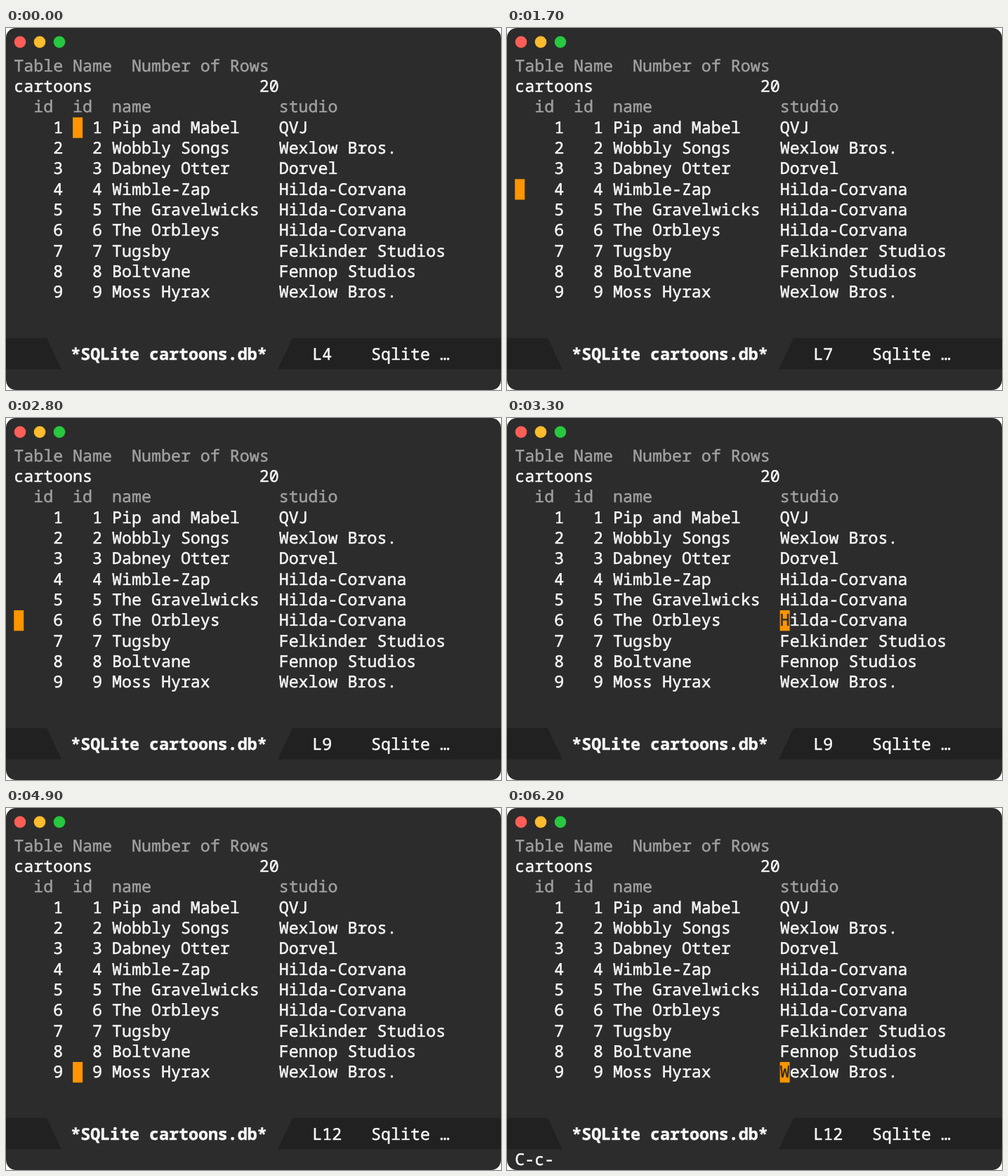
An HTML page that plays this animation: 705 px wide and 516 px high, repeating every 6500 ms.

```html
<!DOCTYPE html>
<html lang="en">
<head>
<meta charset="utf-8">
<style>
  html, body { margin: 0; width: 100%; height: 100%; overflow: hidden; background: #fff; }
  svg { display: block; }
  text {
    --ink: #f8f8f8;
    font: 500 23.3px "Noto Sans Mono", "DejaVu Sans Mono", monospace;
    white-space: pre;
    text-rendering: geometricPrecision;
    fill: var(--ink);
    stroke: var(--ink);
    stroke-width: 0.5px;
  }
  .head { --ink: #a0a0a0; }
  .bold { font-weight: 700; }
  .under { --ink: #2c2c2c; }
  circle { stroke: rgba(0, 0, 0, 0.12); stroke-width: 0.8px; }
</style>
</head>
<body>
<svg id="stage" width="705" height="516" viewBox="0 0 705 516">
  <rect width="705" height="516" rx="14" fill="#2c2c2c"/>
  <circle cx="20" cy="20" r="8.4" fill="#ff5f57"/>
  <circle cx="48" cy="20" r="8.4" fill="#febc2e"/>
  <circle cx="76" cy="20" r="8.4" fill="#28c840"/>
  <path d="M0 442H58L79 486.5H0Z M408 442H705V486.5H387Z" fill="#212121"/>
</svg>
<script>
const LOOP = 6500;
const LEFT = 11.25, CELL = 13.98, LINE = 29.33;
const TOP = 127.4, BASE = 149.8;
const MODE_BASE = 472.7, ECHO_BASE = 509;
const STOPS = [0, 6, 10, 27];
const FIRST_LINE = 4;
const BLINK_OFF = 5700, BLINK_ON = 6200, PREFIX_AT = 6000;

// Moments (in units of 100 ms) at which the cursor jumps to its next stop.
const JUMPS = [
  0, 1, 3, 4, 5, 7, 9, 11, 12, 14, 15, 17, 18, 20, 21, 23, 24, 25,
  27, 28, 30, 31, 33, 34, 36, 38, 39, 41, 42, 44, 46, 47, 49, 50, 52
];

const CARTOONS = [
  ["Pip and Mabel", "QVJ"],
  ["Wobbly Songs", "Wexlow Bros."],
  ["Dabney Otter", "Dorvel"],
  ["Wimble-Zap", "Hilda-Corvana"],
  ["The Gravelwicks", "Hilda-Corvana"],
  ["The Orbleys", "Hilda-Corvana"],
  ["Tugsby", "Felkinder Studios"],
  ["Boltvane", "Fennop Studios"],
  ["Moss Hyrax", "Wexlow Bros."]
];

const stage = document.getElementById("stage");

function add(tag, attrs) {
  const el = document.createElementNS("http://www.w3.org/2000/svg", tag);
  for (const key in attrs) el.setAttribute(key, attrs[key]);
  return stage.appendChild(el);
}

function addText(str, x, y, cls = "") {
  const el = add("text", { x, y, class: cls });
  el.textContent = str;
  return el;
}

const colX = col => LEFT + col * CELL;
const baseY = row => BASE + row * LINE;
const tableRow = (id, name, studio) =>
  id.padStart(5) + id.padStart(4) + " " + name.padEnd(17) + studio;

const rows = CARTOONS.map(([name, studio], i) =>
  tableRow(String(i + 1), name, studio));

addText("Table Name  Number of Rows", LEFT, baseY(-3), "head");
addText("cartoons".padEnd(25) + "20", LEFT, baseY(-2));
addText("  id  id  name".padEnd(27) + "studio", LEFT, baseY(-1), "head");
rows.forEach((row, i) => addText(row, LEFT, baseY(i)));

addText("*SQLite cartoons.db*", 92.2, MODE_BASE, "bold");
const lineNo = addText("", 436.2, MODE_BASE);
addText("Sqlite …", 520.1, MODE_BASE);
const prefix = addText("", LEFT, ECHO_BASE);

const cursor = add("rect", { width: CELL, height: LINE, fill: "#ff9500" });
const under = addText("", 0, 0, "under");

function draw(t) {
  const step = JUMPS.filter(j => j * 100 <= t).length;
  const row = Math.floor(step / STOPS.length);
  const col = STOPS[step % STOPS.length];
  const shown = t < BLINK_OFF || t >= BLINK_ON;

  cursor.setAttribute("x", colX(col));
  cursor.setAttribute("y", TOP + row * LINE);
  cursor.setAttribute("visibility", shown ? "visible" : "hidden");
  under.setAttribute("x", colX(col));
  under.setAttribute("y", baseY(row));
  under.textContent = shown ? rows[row][col] : "";
  lineNo.textContent = "L" + (row + FIRST_LINE);
  prefix.textContent = t >= PREFIX_AT ? "C-c-" : "";
}

const start = performance.now();
function tick() {
  draw((performance.now() - start) % LOOP);
  requestAnimationFrame(tick);
}
tick();
</script>
</body>
</html>
```
